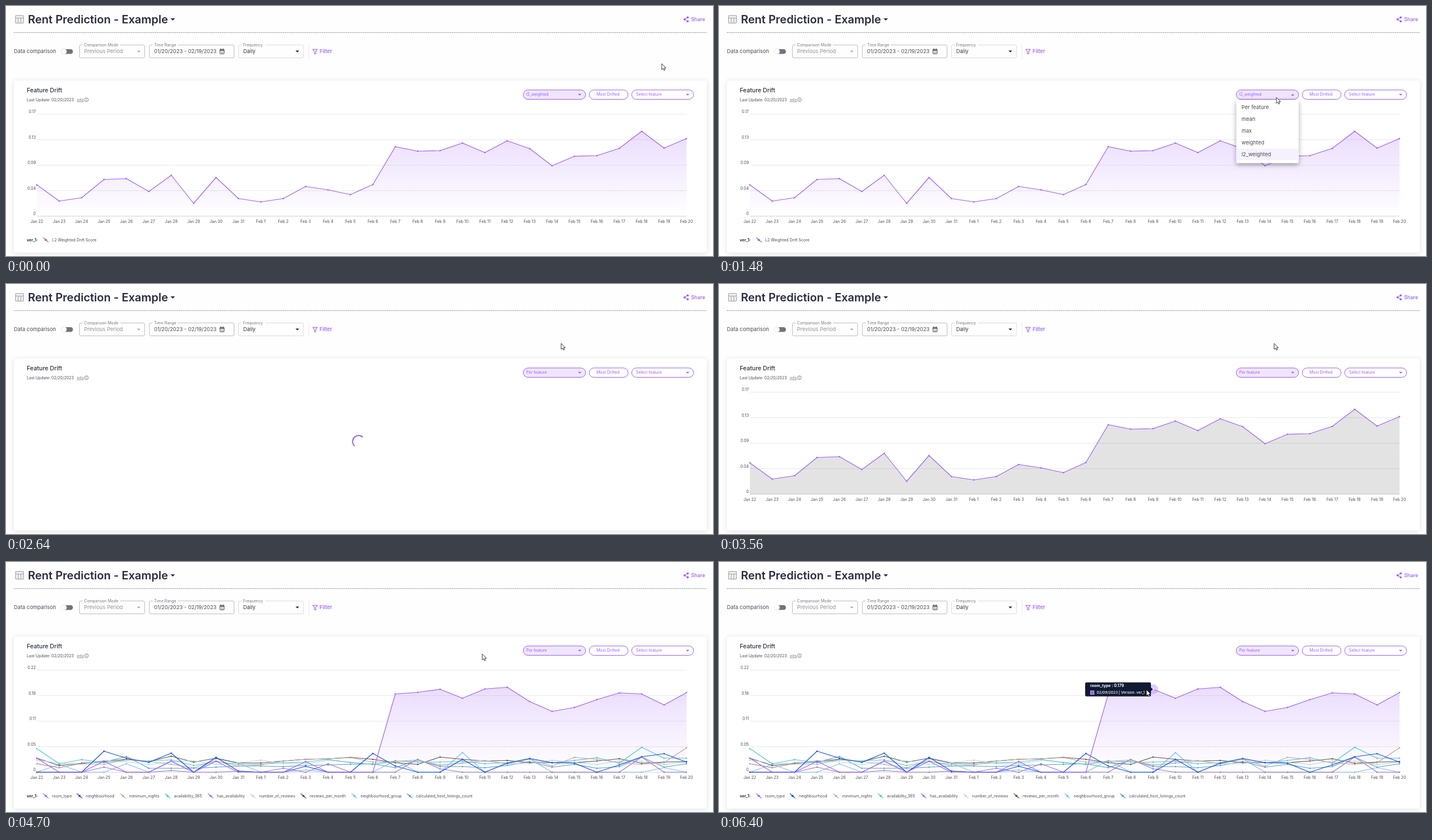
An HTML page for the animation above (6600 ms loop, 1257 by 446 pixels).

```html
<!DOCTYPE html>
<html lang="en">
<head>
<meta charset="utf-8">
<title>Feature drift dashboard</title>
<style>
  html, body { margin: 0; width: 100%; height: 100%; overflow: hidden; background: #fefefe; }
  svg { display: block; width: 1257px; height: 446px; font: 7px Inter, sans-serif; }
  .card { filter: drop-shadow(0 1px 4px rgba(0, 0, 0, .12)); }
  .menu { filter: drop-shadow(0 3px 4px rgba(0, 0, 0, .35)); }
</style>
</head>
<body>
<svg id="stage" viewBox="0 0 1257 446">
  <defs>
    <linearGradient id="fade" gradientUnits="userSpaceOnUse" x1="0" y1="193" x2="0" y2="375">
      <stop offset="0" stop-color="#9b5cf6" stop-opacity=".25"/>
      <stop offset="1" stop-color="#9b5cf6" stop-opacity="0"/>
    </linearGradient>
  </defs>
</svg>
<script>
const PURPLE = '#9b5cff', INK = '#2a2a42', TEXT = '#4a4a55';
const LOOP = 6600, BASE = 375, LEFT = 54.8, STEP = 39.83;
const stage = document.getElementById('stage');

function el(tag, attrs = {}, parent = stage) {
  const node = document.createElementNS('http://www.w3.org/2000/svg', tag);
  for (const key in attrs) node.setAttribute(key, attrs[key]);
  return parent.appendChild(node);
}
const group = (parent = stage) => el('g', {}, parent);
function label(content, x, y, attrs, parent) {
  const node = el('text', { x, y, fill: TEXT, ...attrs }, parent);
  node.textContent = content;
  return node;
}
const path = (d, attrs, parent) => el('path', { d, fill: 'none', ...attrs }, parent);
const rect = (x, y, width, height, attrs, parent) => el('rect', { x, y, width, height, ...attrs }, parent);
const dot = (cx, cy, r, fill, parent) => el('circle', { cx, cy, r, fill }, parent);
const caret = (x, y, w, fill, parent) =>
  path(`M${x - w / 2} ${y - w / 4}h${w}l${-w / 2} ${w / 2}z`, { fill }, parent);

const clamp = v => Math.min(1, Math.max(0, v));
const ramp = (t, from, to) => clamp((t - from) / (to - from));
const easeOut = p => 1 - (1 - p) ** 3;
const easeInOut = p => p * p * (3 - 2 * p);
const show = (node, on) => node.setAttribute('display', on ? 'inline' : 'none');

// Page header
const tableIcon = { stroke: '#b4b4b8', 'stroke-width': 1.5 };
rect(17, 17, 14, 13.5, { fill: '#f4f4f5', rx: 1, ...tableIcon });
path('M17 21.5H31M21.7 21.5V30M26.4 21.5V30', tableIcon);
label('Rent Prediction - Example', 39, 31, { fill: INK, 'font-size': 20, 'font-weight': 600 });
caret(296.5, 24, 8, INK);
path('M1212 20.3L1206.5 23.8L1212 27.3', { stroke: PURPLE });
[[1212, 20.3], [1206.5, 23.8], [1212, 27.3]].forEach(([x, y]) => dot(x, y, 1.9, PURPLE));
label('Share', 1218, 27, { fill: PURPLE, 'font-size': 9, 'font-weight': 500 });
path('M14 47.5H1246', { stroke: '#85858f', 'stroke-dasharray': '2 1.3' });

// Filter bar
label('Data comparison', 14, 84.3, { 'font-size': 9.3 });
rect(102, 77, 17, 8.4, { rx: 4.2, fill: '#74727d' });
el('circle', { cx: 103, cy: 81.2, r: 4.8, fill: '#fff', stroke: '#d8d8da', 'stroke-width': .7 });
function field(x, width, title, titleWidth, value, color, border) {
  rect(x, 69.5, width, 23, { rx: 2.5, fill: 'none', stroke: border });
  rect(x + 5.5, 68, titleWidth + 6, 3, { fill: '#fefefe' });
  label(title, x + 8.3, 71.7, { fill: '#777780' });
  label(value, x + 8.3, 84.3, { fill: color, 'font-size': 9.3 });
}
field(130.5, 116, 'Comparison Mode', 61, 'Previous Period', '#929298', '#bdbdc0');
field(255, 150.5, 'Time Range', 39, '01/20/2023 - 02/19/2023', TEXT, '#bdbdc0');
field(413.5, 115.5, 'Frequency', 36, 'Daily', '#33333d', '#dadadd');
caret(236, 81.2, 6, '#a5a5aa');
caret(518, 81.2, 6.5, '#222');
rect(380.3, 77.5, 7.6, 7.8, { rx: .7, fill: 'none', stroke: TEXT });
path('M380 79.3H388M382 76V78M386.2 76V78', { stroke: TEXT, 'stroke-width': 1.5 });
path('M382 82H387M382 84H387', { stroke: TEXT, 'stroke-dasharray': '1 .7' });
path('M538.5 68V95', { stroke: '#ececef' });
path('M545.7 77.3H553.3L550.8 81V85.2H548.3V81Z', { stroke: PURPLE, 'stroke-width': 1.1 });
label('Filter', 557.5, 84.2, { fill: PURPLE, 'font-size': 9.3, 'font-weight': 500 });

// Card and its controls
rect(14, 133, 1232, 307, { rx: 4, fill: '#fff', class: 'card' });
label('Feature Drift', 37, 154, { fill: INK, 'font-size': 10.6, 'font-weight': 500 });
label('Last Update: 02/20/2023', 37, 169.6);
label('info', 126, 169.6, { 'text-decoration': 'underline', fill: '#777780' });
el('circle', { cx: 143, cy: 167.2, r: 3.4, fill: 'none', stroke: '#666670', 'stroke-width': .8 });
path('M143 166.6V169M143 165V165.8', { stroke: '#666670', 'stroke-width': .8 });
function pill(x, width, content, textX, fill = '#fff') {
  rect(x, 149.8, width, 16.7, { rx: 8.3, fill, stroke: PURPLE });
  return label(content, textX, 160.4, { fill: PURPLE });
}
const metricText = pill(919.7, 110.8, '', 925, '#efe6fd');
pill(1037, 69, 'Most Drifted', 1050);
pill(1112.5, 110, 'Select feature', 1120);
const metricCaret = caret(0, 0, 6, PURPLE);
caret(1212, 158.2, 6, PURPLE);

// Charts
const chart = group();
[193, 238.5, 284, 329.5].forEach(y => path(`M${LEFT} ${y}H1210`, { stroke: '#e8e8ea' }, chart));
path(`M${LEFT} ${BASE}H1210`, { stroke: '#cfcfd3' }, chart);
for (let i = 0; i < 30; i++) {
  const day = i < 10 ? `Jan ${22 + i}` : `Feb ${i - 9}`;
  label(day, LEFT + STEP * i, 387.3, { 'text-anchor': 'middle' }, chart);
}
function axis(values, parent) {
  values.forEach((v, i) => label(v, 53, 191.4 + 45.5 * i, { 'text-anchor': 'end' }, parent));
}
const trace = heights => 'M' + heights.map((h, i) => `${LEFT + STEP * i} ${BASE - h}`).join('L');
const area = (heights, fill, parent) =>
  path(`${trace(heights)}L1210 ${BASE}H${LEFT}Z`, { fill }, parent);
function line(heights, color, parent) {
  path(trace(heights), { stroke: color, 'stroke-width': 1.15, 'stroke-linejoin': 'round' }, parent);
  heights.forEach((h, i) => dot(LEFT + STEP * i, BASE - h, 1.25, color, parent));
}
function legend(x, name, color, parent) {
  path(`M${x} 413L${x + 9.5} 421.5`, { stroke: color, 'stroke-width': 1.2 }, parent);
  dot(x + 4.8, 417.3, 1.9, color, parent);
  label(name, x + 16, 419.6, {}, parent);
}
const version = parent => label('ver_1:', 37, 419.6, { 'font-weight': 700, fill: INK }, parent);

const score = group(chart);
const scoreHeights = [56, 27, 33, 65.5, 67, 44, 73, 23, 69, 31.5, 25.5, 31.5, 53, 47, 38.5,
  56.5, 124, 116, 117, 130.5, 113.5, 134.5, 120.5, 90, 107, 108, 121, 151.5, 121.5, 138.5];
axis(['0.17', '0.13', '0.09', '0.04', '0'], score);
const scoreFill = area(scoreHeights, 'url(#fade)', score);
line(scoreHeights, PURPLE, score);
const scoreLegend = group(score);
version(scoreLegend);
legend(66, 'L2 Weighted Drift Score', PURPLE, scoreLegend);

const features = group(chart);
axis(['0.22', '0.16', '0.11', '0.05', '0'], features);
version(features);
const sparse = peaks => Array.from({ length: 30 }, (_, i) => peaks[i] || 0);
function feature(x, name, color, heights) {
  line(heights, color, features);
  legend(x, name, color, features);
}
// Later features lie underneath, so they are drawn first.
feature(713, 'calculated_host_listings_count', '#4f9fc4',
  [15, 8, 16, 18, 28, 7, 7, 7, 9, 11, 11, 10, 12, 13, 14, 15, 8, 22, 10, 10, 8, 12, 19, 9, 14, 7, 10, 27, 9, 15]
    .slice(0, 30));
feature(614.5, 'neighbourhood_group', '#7abdf5',
  sparse({ 1: 14, 4: 15, 6: 19, 8: 24, 9: 16, 12: 4, 16: 21, 19: 35, 21: 17, 22: 24, 28: 8 }));
feature(524, 'reviews_per_month', '#6b4a3c',
  [25, 12, 16, 19.5, 23, 19, 28.5, 18, 25, 16.5, 16.5, 20, 23, 24, 26.5, 23, 17, 14, 27, 23,
    20, 21, 17, 17, 17, 20, 24, 16, 18, 19]);
feature(434, 'number_of_reviews', '#b3d8e8',
  Array.from({ length: 30 }, (_, i) => 17.5 + 4 * Math.cos(i * 1.9)));
feature(359, 'has_availability', '#a06fd6',
  sparse({ 3: 9, 6: 3, 9: 2, 11: 7, 13: 15, 17: 23, 18: 6, 27: 27 }));
feature(282.5, 'availability_365', '#45c7d6',
  [42, 15, 22.5, 17, 22, 20, 22, 12, 19, 14, 14, 17, 18, 23, 17, 14, 20, 18, 18, 20,
    15, 17, 24, 17, 21, 26, 16, 44.5, 25, 25]);
feature(203, 'minimum_nights', '#c0a69c',
  [15, 8.5, 15, 14, 22, 19, 14, 8, 20, 11, 13, 20, 23, 24, 26, 18, 19, 22, 12, 16,
    20, 15, 23, 11, 26.5, 23, 17, 14, 17, 43.5]);
feature(126, 'neighbourhood', '#0b4cf0',
  sparse({ 3: 37.5, 4: 25, 5: 17.5, 6: 34, 8: 26.5, 9: 2, 12: 10.5, 15: 33.5, 16: 11, 19: 23,
    21: 16, 22: 24.5, 23: 17, 24: 16, 26: 13, 27: 27.5, 28: 33, 29: 18 }));
const roomHeights = sparse({ 0: 25, 3: 19.5, 6: 20, 8: 19.5, 12: 19 });
roomHeights.splice(16, 14, 139.5, 142.5, 148, 132, 148.5, 151.5, 126, 108.5, 115.5, 129.5, 141.5, 139.5, 120, 142);
area(roomHeights, 'url(#fade)', features);
feature(66, 'room_type', PURPLE, roomHeights);

// Loading ring
const ring = el('circle', { r: 20.2, fill: 'none', stroke: PURPLE, 'stroke-width': 3.8 });
function drawRing(t) {
  const phase = (t - 2230) / 1400 % 1;
  const grow = easeInOut(clamp(phase * 2)), shrink = easeInOut(clamp(phase * 2 - 1));
  ring.setAttribute('stroke-dasharray', `${1 + 99 * grow} 200`);
  ring.setAttribute('stroke-dashoffset', -15 * grow - 110 * shrink);
  ring.setAttribute('transform', `translate(627 281) scale(.53) rotate(${phase * 360})`);
}

// Metric menu
const menu = group();
rect(919.7, 167.5, 111, 112.7, { rx: 2, fill: '#fff', class: 'menu' }, menu);
rect(919.7, 254.3, 111, 20.8, { fill: '#f5f2fd' }, menu);
const hoverRow = rect(919.7, 171, 111, 20.8, { fill: '#f5f5f6' }, menu);
['Per feature', 'mean', 'max', 'weighted', 'l2_weighted'].forEach((name, i) =>
  label(name, 929, 184.4 + 20.8 * i, { 'font-size': 9.3 }, menu));

// Tooltip, placed relative to the highlighted point
const tip = group();
dot(0, 0, 9, 'rgba(155, 92, 255, .3)', tip);
dot(0, 0, 1.6, '#fff', tip);
const bubble = group(tip);
path('M-5 -4L-.5 0L-5 4Z', { fill: '#0f1a33' }, bubble);
rect(-121, -12.3, 117, 25, { rx: 2.5, fill: '#0f1a33' }, bubble);
const tipTitle = label('', -112, -3.9, { fill: '#fff', 'font-weight': 700 }, bubble);
rect(-111.5, 2.8, 6.4, 6.4, { fill: PURPLE, stroke: '#e8dcff', 'stroke-width': .7 }, bubble);
const tipBody = label('', -100.5, 8.2, { fill: '#fff', 'font-size': 6.5, 'font-weight': 500 }, bubble);

const pointer = path('M0 0V10.6L2.5 8.4L4.1 12L5.8 11.2L4.3 7.7H7.5Z',
  { fill: '#fff', stroke: '#222', 'stroke-width': .9, 'stroke-linejoin': 'round' });
const pointerKeys = [
  [0, 1166, 103], [130, 1154, 95], [220, 1122, 91], [330, 1070, 108], [450, 1020, 140],
  [610, 991, 163], [1500, 991, 163], [1750, 985, 182], [2300, 985, 182], [2420, 986, 135],
  [2550, 987, 106], [4150, 987, 106], [4400, 955, 118], [4560, 900, 140], [4700, 847, 164],
  [4840, 812, 184], [5000, 785, 206], [5200, 765, 226], [5530, 761, 229], [5600, 756, 231],
  [5800, 737, 237], [6210, 737, 237], [6340, 760, 228]
];
function pointerAt(t) {
  const next = pointerKeys.findIndex(key => key[0] > t);
  if (next < 0) return pointerKeys.at(-1).slice(1);
  const [t0, x0, y0] = pointerKeys[next - 1], [t1, x1, y1] = pointerKeys[next];
  const p = ramp(t, t0, t1);
  return [x0 + (x1 - x0) * p, y0 + (y1 - y0) * p];
}

function draw(t) {
  const loading = t >= 2230 && t < 3480;
  const detailed = t >= 3630;
  show(chart, !loading);
  show(ring, loading);
  if (loading) drawRing(t);
  show(score, !detailed);
  show(features, detailed);
  show(scoreLegend, t < 2230);
  scoreFill.setAttribute('fill', t < 2230 ? 'url(#fade)' : 'rgba(0, 0, 0, .11)');

  metricText.textContent = t < 2100 ? 'l2_weighted' : 'Per feature';
  const open = t >= 1080 && t < 2100;
  metricCaret.setAttribute('transform', `translate(1020 158.2) scale(1 ${open ? -1 : 1})`);
  const unfold = easeOut(ramp(t, 1080, 1330));
  show(menu, t >= 1080 && t < 2260);
  menu.setAttribute('opacity', unfold * (1 - ramp(t, 2100, 2260)));
  menu.setAttribute('transform', `translate(0 ${167.5 * (.44 - .44 * unfold)}) scale(1 ${.56 + .44 * unfold})`);
  show(hoverRow, t >= 1660);

  const away = easeOut(ramp(t, 5600, 5860)) - easeOut(ramp(t, 6250, 6400));
  const eighth = t >= 5600 && t < 6270;
  show(tip, t >= 5130);
  tip.setAttribute('transform', `translate(${772 - 39.8 * away} ${227 + 5.5 * away})`);
  bubble.setAttribute('opacity', ramp(t, 5130, 5330));
  tipTitle.textContent = `room_type : ${eighth ? '0.172' : '0.179'}`;
  tipBody.textContent = `02/0${eighth ? 8 : 9}/2023 | Version: ver_1`;

  pointer.setAttribute('transform', `translate(${pointerAt(t)})`);
}

function tick() {
  draw(performance.now() % LOOP);
  requestAnimationFrame(tick);
}
tick();
</script>
</body>
</html>
```
